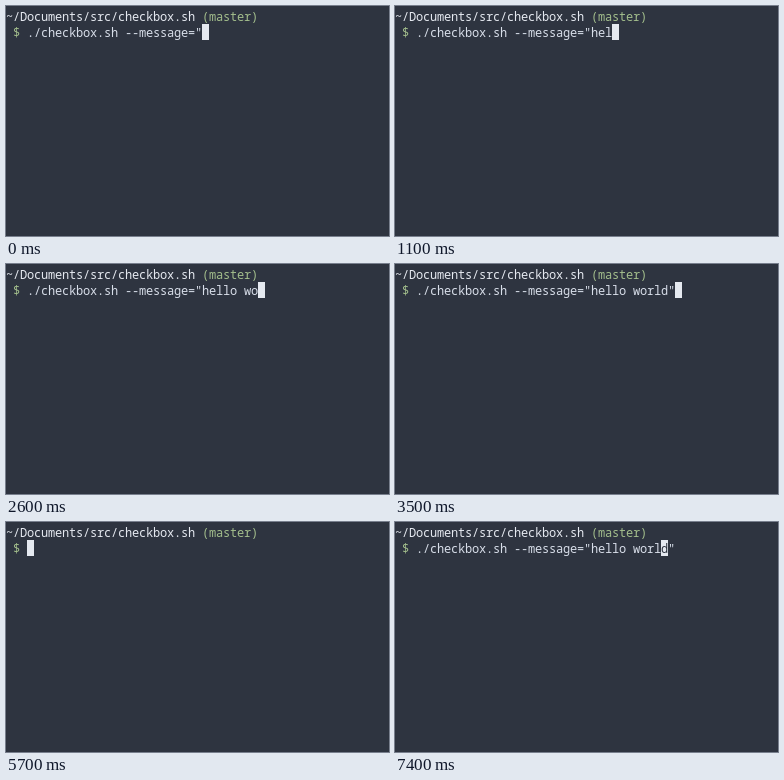
Recreate the animation shown at these times as an HTML page with a canvas. Size 383 px wide and 230 px high, loop 8000 ms.

```html
<!DOCTYPE html>
<html lang="en">
<head>
<meta charset="utf-8">
<title>Terminal checkbox demo</title>
<style>
  html, body { margin: 0; width: 100%; height: 100%; overflow: hidden; background: #2e3440; }
  canvas { display: block; }
</style>
</head>
<body>
<canvas></canvas>
<script>
const WIDTH = 383, HEIGHT = 230, LOOP = 8000;
const CELL = 7, LINE = 16, TOP = 2, BASELINE = 13;
const BACK = '#2e3440', TEXT = '#d8dee9', BRIGHT = '#e5e9f0', GREEN = '#a3be8c', BLUE = '#81a1c1';

const PROMPT_COLS = 3;
const MESSAGE = 'hello world';
const PREFIX = './checkbox.sh --message="';
const COMMAND = PREFIX + MESSAGE + '"';

// [start ms, characters typed after the opening quote]
const TYPING = [[0, 0], [900, 1], [1000, 2], [1100, 3], [1300, 4], [1500, 5], [1800, 6],
                [2500, 7], [2600, 8], [2800, 10], [3000, 11], [3500, 12]];
const MENU_OPEN = 4400, MENU_CLOSE = 5700, RECALL = 6300;
const CURSOR_LEFT = [6900, 7400];

const canvas = document.querySelector('canvas');
const ctx = canvas.getContext('2d');
const scale = window.devicePixelRatio || 1;
canvas.width = WIDTH * scale;
canvas.height = HEIGHT * scale;
canvas.style.width = WIDTH + 'px';
canvas.style.height = HEIGHT + 'px';
ctx.scale(scale, scale);
ctx.font = '12px "Noto Sans Mono", "DejaVu Sans Mono", monospace';
ctx.textAlign = 'center';

function write(row, col, text, color = TEXT) {
  ctx.fillStyle = color;
  [...text].forEach((char, i) =>
    ctx.fillText(char, (col + i + 0.5) * CELL, TOP + row * LINE + BASELINE));
}

function drawCursor(row, col, char = '') {
  ctx.fillStyle = BRIGHT;
  ctx.fillRect(col * CELL, TOP + row * LINE, CELL, LINE);
  write(row, col, char, BACK);
}

function drawShell(typed, cursor) {
  write(0, 0, '~/Documents/src/checkbox.sh', BRIGHT);
  write(0, 28, '(master)', GREEN);
  write(1, 1, '$', GREEN);
  write(1, PROMPT_COLS, typed);
  drawCursor(1, PROMPT_COLS + cursor, typed[cursor]);
}

function drawMenu() {
  const rule = '-'.repeat(50);
  write(0, 2, MESSAGE);
  write(1, 0, rule);
  for (let n = 1; n <= 10; n++) write(n + 1, 4, `[ ] Option ${n}`, n === 1 ? BLUE : TEXT);
  write(12, 0, rule);
  write(13, 2, '1/30');
  drawCursor(14, 0);
}

function draw(time) {
  ctx.fillStyle = BACK;
  ctx.fillRect(0, 0, WIDTH, HEIGHT);
  if (time < MENU_OPEN) {
    const count = TYPING.filter(([start]) => start <= time).pop()[1];
    const length = PREFIX.length + count;
    drawShell(COMMAND.slice(0, length), length);
  } else if (time < MENU_CLOSE) {
    drawMenu();
  } else if (time < RECALL) {
    drawShell('', 0);
  } else {
    const steps = CURSOR_LEFT.filter(start => start <= time).length;
    drawShell(COMMAND, COMMAND.length - steps);
  }
}

const begin = performance.now();
function tick() {
  draw((performance.now() - begin) % LOOP);
  requestAnimationFrame(tick);
}
tick();
</script>
</body>
</html>
```
